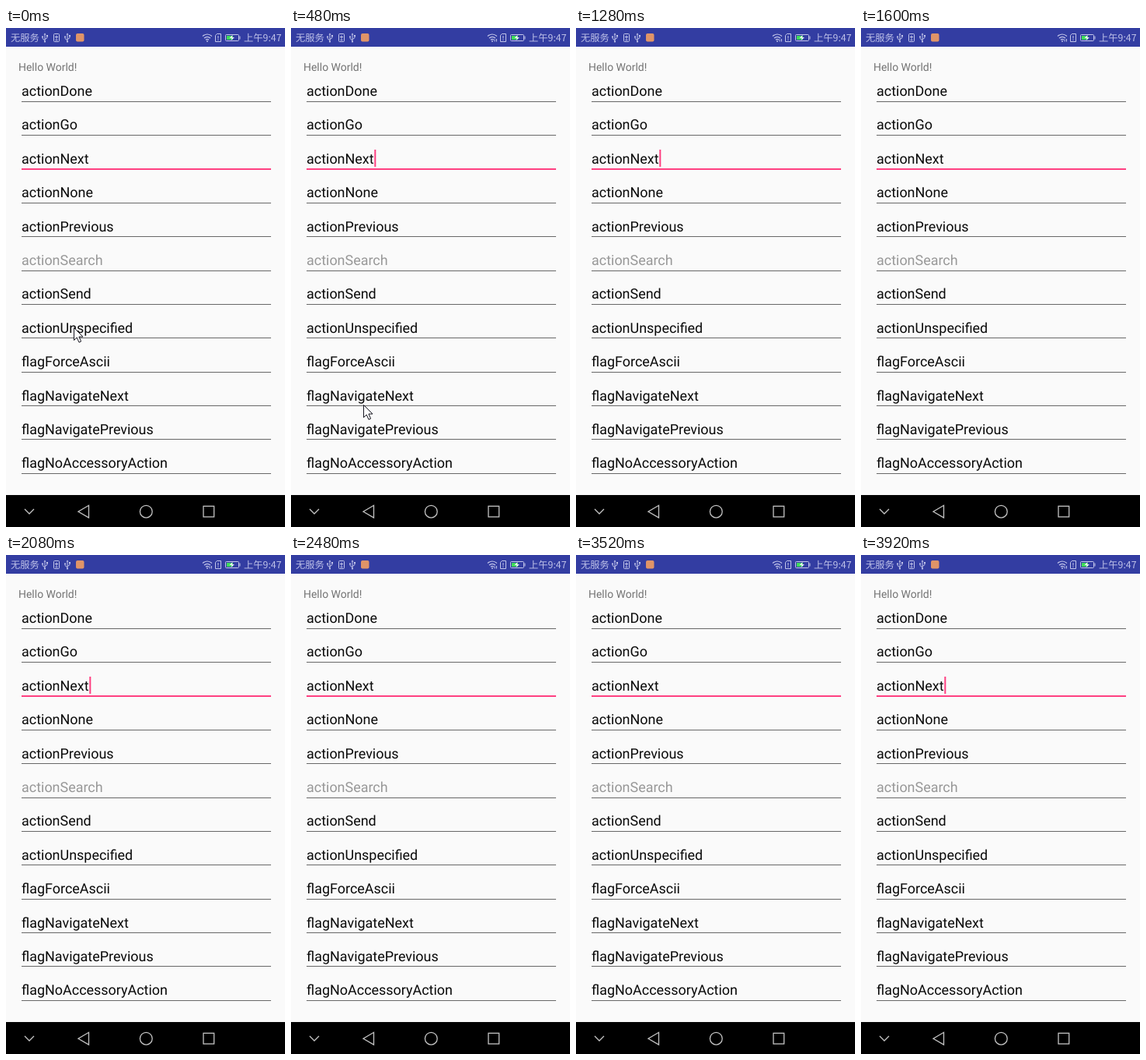
Recreate the animation shown at these times as an HTML page. Size 359 px wide and 640 px high, loop 4.48 s.

```html
<!DOCTYPE html>
<html lang="zh">
<head>
<meta charset="utf-8">
<title>Input actions</title>
<style>
html, body { margin: 0; width: 100%; height: 100%; overflow: hidden; background: #fafafa; }
svg { display: block; width: 359px; height: 640px; }
text { font-family: Roboto, sans-serif; text-rendering: geometricPrecision; }
.status text { font-family: "Noto Sans CJK SC", "Noto Sans CJK", Roboto, sans-serif; font-size: 12.3px; fill: #bfc2e8; }
.icon { fill: none; stroke: #c3c6ea; stroke-width: 1; }
.nav { fill: none; stroke: #c4c4c4; stroke-width: 1.3; }
</style>
</head>
<body>
<svg viewBox="0 0 359 640">
  <defs>
    <g id="usb" class="icon">
      <path d="M0 -4.5V5M-3 -1V1L0 3.5M3 -2.5V0L0 2.2"/>
      <path d="M-1.5 -4L0 -6L1.5 -4Z" fill="#c3c6ea" stroke="none"/>
      <circle cx="0" cy="5" r="1.1" fill="#c3c6ea" stroke="none"/>
      <circle cx="-3" cy="-1.2" r="1" fill="#c3c6ea" stroke="none"/>
      <path d="M2 -3.5h2v2h-2z" fill="#c3c6ea" stroke="none"/>
    </g>
  </defs>
  <rect width="359" height="640" fill="#fafafa"/>

  <g class="status">
    <rect width="359" height="24" fill="#333da2"/>
    <text x="6" y="16.8">无服务</text>
    <use href="#usb" x="50" y="12.5"/>
    <g class="icon">
      <rect x="61.5" y="7.5" width="7" height="10" rx="1"/>
      <path d="M65 9.5v5M63 11.5h4M63.5 15.5h3"/>
    </g>
    <use href="#usb" x="79" y="12.5"/>
    <rect x="90" y="7" width="10.5" height="10.5" rx="2" fill="#e09468"/>
    <g class="icon">
      <path d="M253 10.5Q259 5.5 265 10.5M255 13Q259 9.6 263 13M257 15.2Q259 13.6 261 15.2" stroke-width="1.2"/>
      <circle cx="259" cy="17" r=".9" fill="#c3c6ea" stroke="none"/>
      <path id="data" d="M262.2 17.5v-3M264.5 14v3.5"/>
      <path d="M269.5 9.5L271.5 7.5H276.5V17.5H269.5ZM273 10v3.5M273 14.5v1.3"/>
      <rect x="282.5" y="8.5" width="17" height="8" rx="1"/>
      <path d="M301 10.5v4"/>
    </g>
    <rect x="284" y="10" width="8" height="5" fill="#3fdc5a"/>
    <path d="M291.5 9L287.5 13H290.5L289.5 16L294 12H291Z" fill="#eef"/>
    <text x="306" y="16.8">上午9:47</text>
  </g>

  <text x="16" y="55" font-size="13.96" fill="#747474">Hello World!</text>
  <g id="fields" font-size="17.95"></g>
  <rect id="caret" x="107.3" y="156" width="2" height="22" fill="#ff4081"/>

  <rect y="599" width="359" height="41" fill="#000"/>
  <g class="nav">
    <path d="M24 617L30 623L36 617"/>
    <path d="M106.5 612.3V628L93 620.2Z"/>
    <circle cx="180.3" cy="620.2" r="7.9"/>
    <rect x="254" y="613.3" width="13.7" height="13.7"/>
  </g>

  <path id="pointer" d="M.5 .5V16.5L4.2 13L7 19.2L9.6 18L6.9 12H12Z"
        fill="#fff" stroke="#15151f" stroke-width="1"/>
</svg>
<script>
const LOOP = 4480;
const get = id => document.getElementById(id);
const labels = ["actionDone", "actionGo", "actionNext", "actionNone", "actionPrevious",
  "actionSearch", "actionSend", "actionUnspecified", "flagForceAscii",
  "flagNavigateNext", "flagNavigatePrevious", "flagNoAccessoryAction"];
const focused = 2, hint = 5, pitch = 43.38;

function add(tag, attrs, text = "") {
  const el = document.createElementNS("http://www.w3.org/2000/svg", tag);
  for (const key in attrs) el.setAttribute(key, attrs[key]);
  el.textContent = text;
  get("fields").append(el);
}

labels.forEach((label, i) => {
  const active = i === focused;
  const row = top => Math.floor(top + i * pitch);
  add("text", { x: 20, y: row(87.6), fill: i === hint ? "#989898" : "#0a0a0a" }, label);
  add("rect", {
    x: 20, y: row(94.15), width: 321,
    height: active ? 2 : 1, fill: active ? "#ff4081" : "#686868"
  });
});

// Caret toggles at each time, starting hidden.
const blinks = [400, 800, 1280, 1600, 2080, 2480, 3040, 3520, 3920];
// Pointer steps: time, x, y; no position means hidden.
const moves = [[0, 87, 384], [320, 89, 417], [400, 91, 450], [480, 93, 483],
  [640, 95, 520], [720, 97, 560], [800]];

function draw() {
  const t = performance.now() % LOOP;
  const shown = blinks.filter(b => b <= t).length % 2;
  get("caret").setAttribute("visibility", shown ? "visible" : "hidden");
  get("data").setAttribute("visibility", t >= 320 ? "visible" : "hidden");
  const [, x, y] = moves.filter(m => m[0] <= t).pop();
  const pointer = get("pointer");
  pointer.setAttribute("visibility", x === undefined ? "hidden" : "visible");
  if (x !== undefined) pointer.setAttribute("transform", `translate(${x} ${y})`);
  requestAnimationFrame(draw);
}
draw();
</script>
</body>
</html>
```
